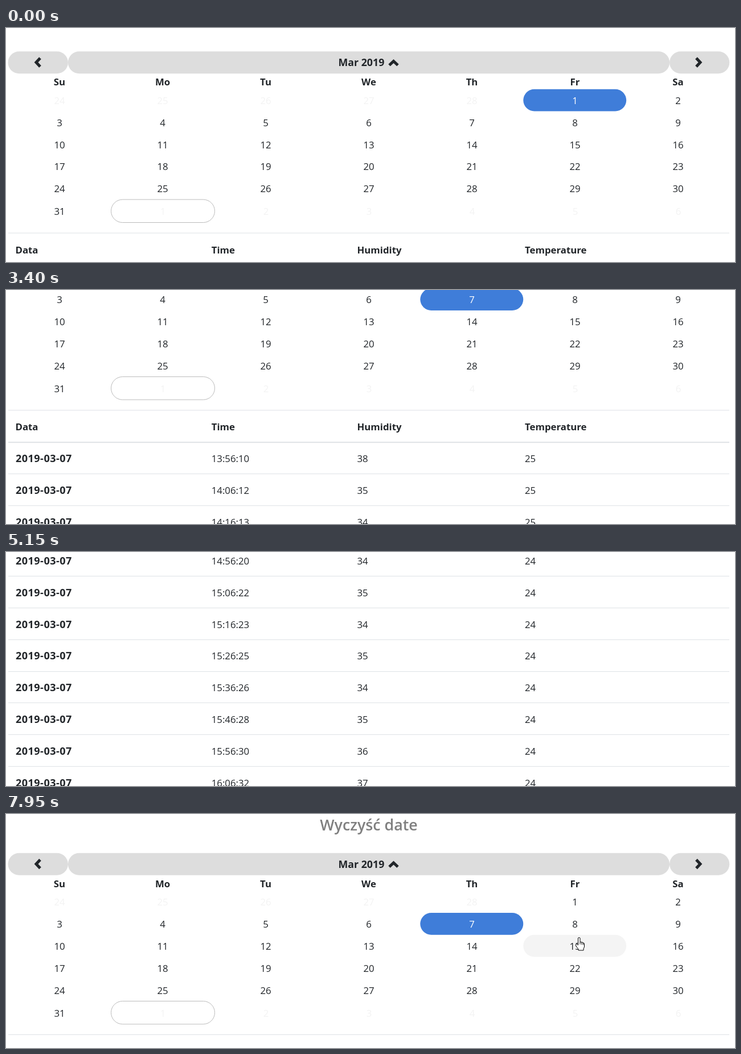
An HTML page for the animation above (8000 ms loop, 1280 by 412 pixels).

```html
<!DOCTYPE html>
<html lang="pl">
<head>
<meta charset="utf-8">
<title>Calendar</title>
<style>
html, body { margin: 0; width: 100%; height: 100%; overflow: hidden; background: #fff; }
svg { display: block; }
text { font: 16.8px "Open Sans", "Noto Sans", sans-serif; fill: #212529; white-space: pre; }
.b { font-weight: 700; }
.mid { text-anchor: middle; }
.month { font-size: 17.8px; }
.date { font-size: 18px; letter-spacing: .5px; }
.title { font-size: 26.8px; font-weight: 600; fill: #808080; }
.off { fill: #f3f3f3; }
.icon { fill: none; stroke: #212529; stroke-width: 5; }
</style>
</head>
<body>
<svg id="stage" width="1280" height="412" viewBox="0 0 1280 412"></svg>
<script>
const NS = 'http://www.w3.org/2000/svg';
const LOOP = 8000, PICK = 2230;
const COL = 180.95, ROW = 38.8, LEFT = 3.5, TOP = 135.2;
const BLUE = '#3f7dd9', HOVER = '#f4f4f4';
const stage = document.getElementById('stage');

function add(parent, tag, attrs, content) {
  const el = document.createElementNS(NS, tag);
  for (const k in attrs) el.setAttribute(k, attrs[k]);
  if (content !== undefined) el.textContent = content;
  parent.appendChild(el);
  return el;
}
// y is the middle of the capitals and digits
const label = (x, y, s, cls = '') => add(page, 'text', { x, y: y + 6.2, class: cls }, s);
const pill = (x, y, w, h, fill) => add(page, 'rect', { x, y, width: w, height: h, rx: h / 2, fill });
const rule = (y, h) => add(page, 'rect', { x: 4, y, width: 1266, height: h, fill: '#dee2e6' });

const page = add(stage, 'g', {});
const title = add(page, 'text', { x: 637, y: 29, class: 'title mid' }, 'Wyczyść date');

// Month bar
pill(3.5, 68.7, 105.4, 39, '#ddd');
pill(108.9, 68.7, 1056.2, 39, '#ddd');
pill(1165.1, 68.7, 105.2, 39, '#ddd');
label(583.5, 88.5, 'Mar 2019', 'b month');
for (const points of ['60,80.5 53,88 60,95.5', '1212,80.5 1219,88 1212,95.5', '673,93 680.5,86 688,93'])
  add(page, 'polyline', { points, class: 'icon' });

// Days
const hover = pill(0, 0, COL, ROW, HOVER);
const chosen = pill(0, 0, COL, ROW, BLUE);
const days = [];
add(page, 'rect', { x: 184.5, y: 329.5, width: 182, height: 40.5, rx: 20.2, fill: '#fff', stroke: '#bbb' });
['Su', 'Mo', 'Tu', 'We', 'Th', 'Fr', 'Sa'].forEach((s, c) => label(94 + c * 181, 122.5, s, 'b mid'));
for (let i = 0; i < 42; i++) {
  const r = Math.floor(i / 7), c = i % 7, d = i - 4;
  const other = d < 1 || d > 31;
  const n = d < 1 ? d + 28 : d > 31 ? d - 31 : d;
  const nudge = r === 5 ? 1.2 : 0;
  days.push(label(94 + c * 181 + (c ? nudge / 2 : 0), TOP + 20 + r * ROW + nudge, n, other ? 'mid off' : 'mid'));
}

// Readings
const X = [17, 360.7, 616.5, 911];
rule(388, 1);
['Data', 'Time', 'Humidity', 'Temperature'].forEach((s, i) => label(i ? X[i] : 16.5, 418, s, 'b'));
rule(444, 2);
const secs = [10, 12, 13, 15, 17, 18, 20, 22, 23, 25, 26, 28, 30, 32];
const humid = [38, 35, 34, 34, 34, 35, 34, 35, 34, 35, 34, 35, 36, 37];
secs.forEach((sec, i) => {
  const y = 474 + i * 55.8, m = 13 * 60 + 56 + i * 10;
  const time = [Math.floor(m / 60), m % 60, sec].map(v => String(v).padStart(2, '0')).join(':');
  label(X[0], y, '2019-03-07', 'b date');
  label(X[1], y, time);
  label(X[2], y, humid[i]);
  label(X[3], y, i < 4 ? 25 : 24);
  rule(Math.round(y + 26.4), 1);
});

// Pointer, tip at 0,0
const pen = { fill: '#fff', stroke: '#000', 'stroke-width': 1, 'stroke-linejoin': 'round' };
const hand = add(stage, 'path', { ...pen, d: 'M-2 14V2Q-2 .5 -.3 .5Q1.5 .5 1.5 2V8.5Q3.5 7.8 4.5 9Q6.5 8.4 7.2 10Q9 10 9 12V16Q9 18 7.5 20V23H-1.5V21Q-4 18 -6 14.5Q-6.8 12.5 -5 12Q-3.5 12 -2 14ZM1.5 8.5V12.5M4.5 9V13M7.2 10V13.5' });
const arrow = add(stage, 'path', { ...pen, d: 'M.5 .5V16.5L4.2 13L6.6 18.5L9 17.4L6.6 12H11.5Z' });

// Moves: start, end, steps, then the value reached
const scrolls = [
  [3150, 3470, 5, 221], [3720, 3890, 3, 331.5], [4270, 5150, 12, 793],
  [6020, 6410, 6, 446], [6720, 7170, 7, 110.5], [7250, 7400, 3, 0]
];
const paths = [
  [200, 280, 2, 1141, 409], [460, 1220, 11, 983, 160], [1300, 1610, 5, 828, 162],
  [2010, 2080, 2, 838, 163], [2310, 2770, 7, 1215, 430],
  [7649, 7649, 1, 1225, 242], [7650, 7950, 5, 1006.5, 217]
];

function along(moves, from, t) {
  let at = from;
  for (const [start, end, n, ...to] of moves) {
    if (t < start) break;
    const gap = (end - start) / (n - 1) || 1;
    const k = Math.min(1, (Math.floor((t - start + 5) / gap) + 1) / n);
    at = at.map((v, i) => v + (to[i] - v) * k);
  }
  return at;
}

const show = (el, on) => el.setAttribute('visibility', on ? 'visible' : 'hidden');
function place(el, i) {
  el.setAttribute('x', LEFT + (i % 7) * COL);
  el.setAttribute('y', TOP + Math.floor(i / 7) * ROW);
}

function draw(t) {
  const picked = t >= PICK;
  const [scroll] = along(scrolls, [0], t);
  const shift = picked ? scroll : 27.5;
  page.setAttribute('transform', `translate(0 ${-shift})`);
  show(title, picked);

  const sel = picked ? 11 : 5;
  place(chosen, sel);
  days[5].style.fill = picked ? '' : '#fff';
  days[11].style.fill = picked ? '#fff' : '';

  const [x, y] = along(paths, [1150, 414], t);
  const c = Math.floor((x - LEFT) / COL), r = Math.floor((y + shift - TOP) / ROW);
  const seen = t < 2770 || t >= 7650;
  const inside = seen && c >= 0 && c < 7 && r >= 0 && r < 6;
  const cell = r * 7 + c;
  const lit = inside && cell > 4 && cell < 36;
  show(hover, lit);
  if (lit) place(hover, cell);
  show(hand, inside);
  show(arrow, seen && !inside);
  for (const p of [hand, arrow]) p.setAttribute('transform', `translate(${x} ${y})`);
}

function tick() {
  draw(performance.now() % LOOP);
  requestAnimationFrame(tick);
}
tick();
</script>
</body>
</html>
```
